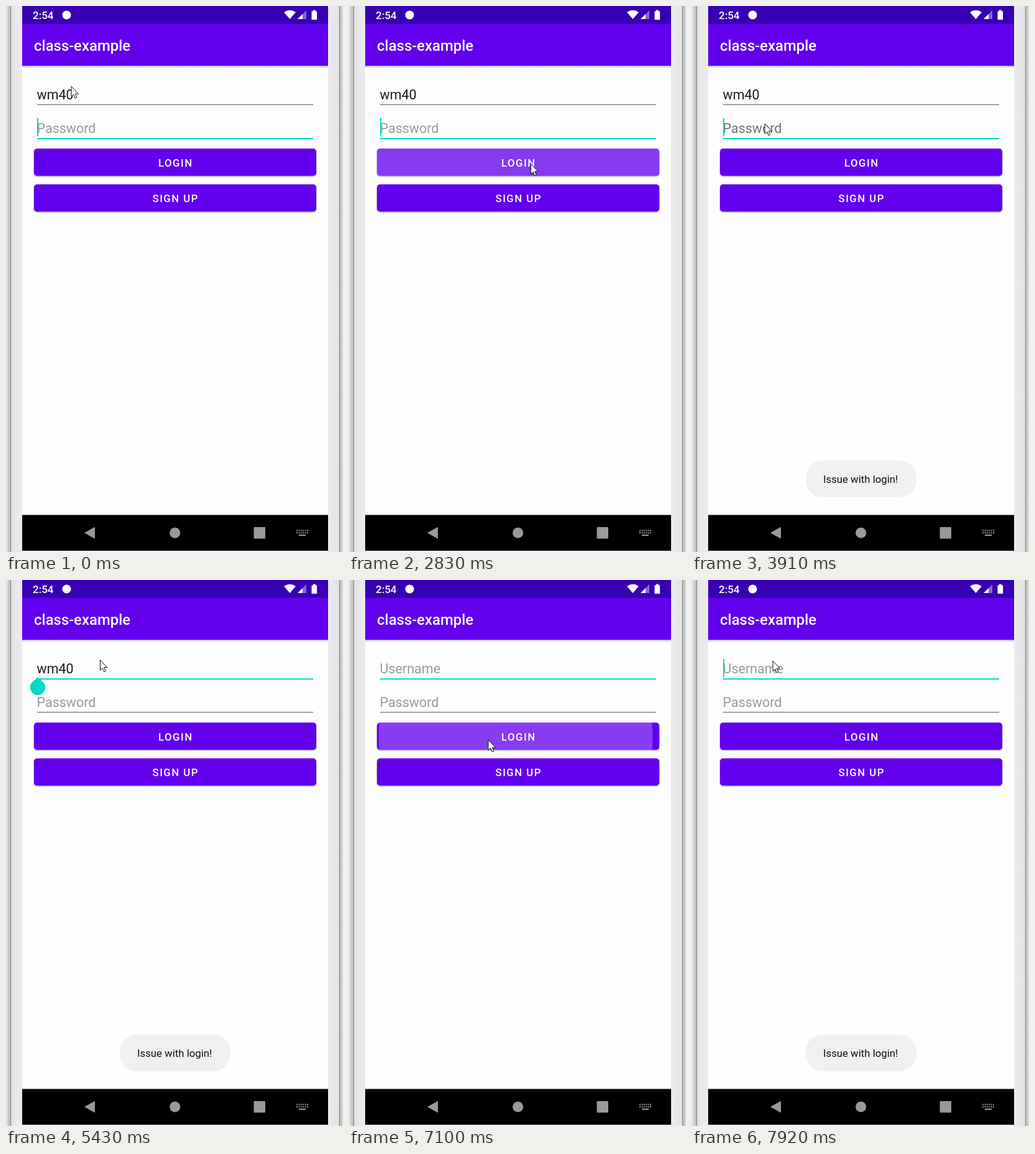
Animation, 542 px wide and 877 px high, one loop 8000 ms. Source, as an HTML page:

```html
<!DOCTYPE html>
<html lang="en">
<head>
<meta charset="utf-8">
<title>Login screen</title>
<style>
  html, body { margin: 0; width: 100%; height: 100%; overflow: hidden; background: #ebebed; }
  svg { display: block; width: 542px; height: 877px; font-family: Roboto, sans-serif; }
  .field { font-size: 21.5px; }
  .buttons { fill: #6200ee; filter: drop-shadow(0 1.5px 1px #0006); }
  .label { font-size: 16.76px; font-weight: 500; letter-spacing: 1.5px; fill: #fff; text-anchor: middle; }
</style>
</head>
<body>
<svg viewBox="0 0 542 877">
  <defs>
    <linearGradient id="bezel">
      <stop offset="0" stop-color="#dcd6d8"/>
      <stop offset=".12" stop-color="#e6e1e3"/>
      <stop offset=".16" stop-color="#b5b0b2"/>
      <stop offset=".22" stop-color="#e0dcde"/>
      <stop offset=".28" stop-color="#858284"/>
      <stop offset=".34" stop-color="#e4e4e6"/>
      <stop offset="1" stop-color="#ececee"/>
    </linearGradient>
    <linearGradient id="shade" x2="0" y2="1">
      <stop stop-color="#bbb"/>
      <stop offset="1" stop-color="#fdfdfd"/>
    </linearGradient>
    <clipPath id="loginShape"><rect x="45" y="229" width="454" height="43.7" rx="5"/></clipPath>
  </defs>

  <rect id="side" width="26" height="877" fill="url(#bezel)"/>
  <use href="#side" transform="translate(544) scale(-1 1)"/>
  <rect x="26" width="492" height="818" fill="#fdfdfd"/>
  <rect x="26" y="96" width="492" height="4" fill="url(#shade)"/>
  <rect x="26" y="29" width="492" height="67" fill="#6200ee"/>
  <rect x="26" width="492" height="29" fill="#3700b3"/>

  <g fill="#fff" font-weight="500">
    <text x="43" y="21" font-size="17">2:54</text>
    <circle cx="97.5" cy="14.5" r="7"/>
    <path d="M447 10Q456.5 3.500 466 10L456.500 21Z"/>
    <path d="M469 21L483 7V21Z" opacity=".4"/>
    <path d="M469 21L477 13V21Z"/>
    <path d="M491.500 8.500h2.300v-2h4v2h2.300v13.500h-8.600Z"/>
    <text x="45" y="71.500" font-size="23.9">class-example</text>
  </g>

  <rect x="26" y="817.500" width="492" height="57.500" fill="#000"/>
  <g fill="#999">
    <path d="M126 846.300L143 836.800V855.800Z"/>
    <circle cx="271.7" cy="846.2" r="8.5"/>
    <rect x="398.600" y="837" width="18.400" height="18.400" rx="1"/>
    <path d="M467 842.500h19M467 846.200h19" stroke="#999" stroke-width="2" stroke-dasharray="2 1.4"/>
    <rect x="471" y="849" width="11" height="2"/>
  </g>

  <text id="user" class="field" x="49.500" y="149.500"/>
  <text id="pass" class="field" x="49.500" y="203.500">Password</text>
  <rect id="userLine" x="50" width="444"/>
  <rect id="passLine" x="50" width="444"/>
  <g fill="#03dac5">
    <rect id="caret" x="50" width="2" height="29"/>
    <path id="handle" d="M51 156l8.700 8a12.200 12.200 0 1 1 -17.400 0Z"/>
  </g>

  <g class="buttons">
    <rect x="45" y="229" width="454" height="43.7" rx="5"/>
    <rect x="45" y="286.6" width="454" height="43.7" rx="5"/>
  </g>
  <g clip-path="url(#loginShape)"><circle id="ripple" cx="268" cy="251" fill="#fff"/></g>
  <text class="label" x="272.75" y="257.8">LOGIN</text>
  <text class="label" x="272.75" y="315.2">SIGN UP</text>

  <rect id="toastBox" x="183" y="730" width="178" height="59" rx="27" fill="#f0f0f0"/>
  <text id="toastText" x="211" y="766" font-size="16.76" fill="#111">Issue with login!</text>
  <path id="pointer" d="M0 0V16.500L3.700 13 6.200 19 8.800 17.900 6.300 12.100H11.500Z" fill="#fff" stroke="#111"/>
</svg>
<script>
const LOOP = 8000, NAME = 'wm40', TEAL = '#03dac5';
const CLICKS = [2700, 7100];               // presses on LOGIN
const FOCUS = 4630, ERASE = 5590;          // username gets focus, then is deleted
const glides = [                           // pointer moves: [start, end, x, y]
  [2290, 2620, 292.5, 253.5],
  [3410, 3790, 117, 189],
  [4060, 4360, 130, 146],
  [5030, 5300, 151.5, 128.5],
  [6020, 6560, 224, 257],
  [7220, 7780, 134, 118],
  [7800, 7920, 130, 130]
];

const $ = id => document.getElementById(id);
const set = (id, attrs) => {
  for (const key in attrs) $(id).setAttribute(key, attrs[key]);
};
const clamp = v => Math.min(1, Math.max(0, v));
const smooth = v => v * v * (3 - 2 * v);

function pointerAt(t) {
  let x = 105, y = 129;
  for (const [start, end, toX, toY] of glides) {
    const k = smooth(clamp((t - start) / (end - start)));
    x += (toX - x) * k;
    y += (toY - y) * k;
  }
  return `translate(${x} ${y})`;
}

function underline(id, y, focused) {
  set(id, focused ? { y, height: 2, fill: TEAL } : { y: y - .2, height: 1.3, fill: '#747474' });
}

function draw(now) {
  const t = now % LOOP;
  const onUser = t >= FOCUS;
  const name = NAME.slice(Math.ceil(4 * clamp((t - ERASE) / 150)));
  const age = t - (CLICKS.findLast(click => click <= t) ?? -LOOP);
  const toast = clamp(Math.min((age - 310) / 350, (4100 - age) / 300));
  const blinkStart = t >= ERASE ? ERASE : onUser ? FOCUS : -250;

  set('pointer', { transform: pointerAt(t) });
  set('ripple', { r: 220 + age / 3, opacity: .24 * clamp((400 - age) / 280) });
  set('toastBox', { opacity: toast ** 3 });
  set('toastText', { opacity: toast });
  set('caret', { y: onUser ? 127 : 180, opacity: (t - blinkStart) % 1000 < 500 ? 1 : 0 });
  set('handle', { opacity: t < ERASE ? clamp((t - FOCUS) / 400) : 0 });
  $('user').textContent = name || 'Username';
  set('user', { fill: name ? '#1c1c1c' : '#9b9b9b' });
  set('pass', { fill: t >= 3850 && t < 4060 ? '#747474' : '#9b9b9b' });
  underline('userLine', 158, onUser);
  underline('passLine', 212, !onUser);
  requestAnimationFrame(draw);
}
draw(0);
</script>
</body>
</html>
```
